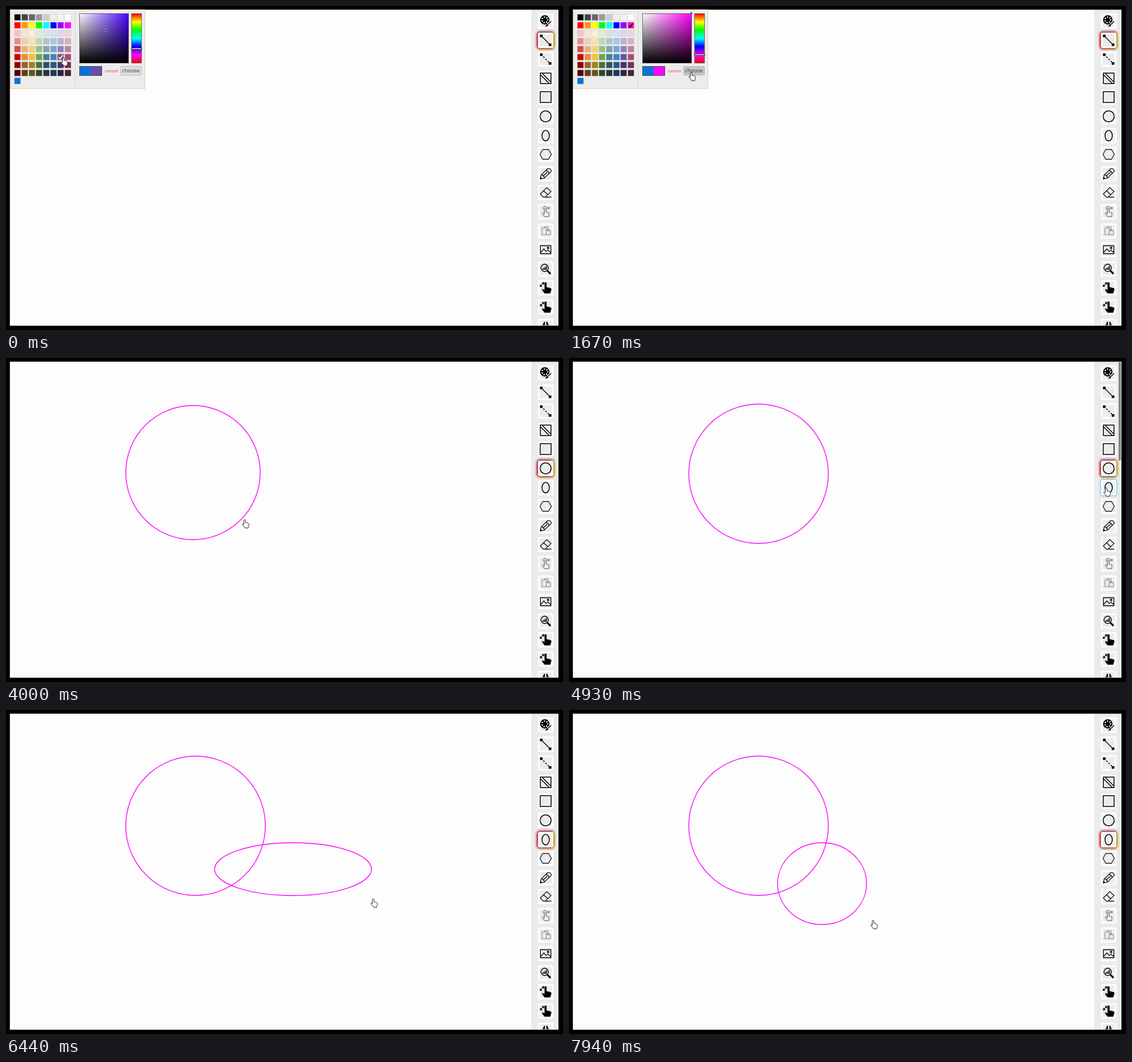
Write an HTML page that moves like this. It is 980 px wide and 571 px high and loops after 8 s.

```html
<!DOCTYPE html>
<html lang="en">
<head>
<meta charset="utf-8">
<title>Drawing board</title>
<style>
html, body { margin: 0; width: 100%; height: 100%; overflow: hidden; background: #000; }
#stage { position: absolute; left: 0; top: 0; width: 980px; height: 571px; overflow: hidden; background: #000; }
#bar { position: absolute; left: 924px; top: 6px; width: 48px; height: 557px; overflow: hidden; }
.tool { position: absolute; left: 12px; width: 27px; height: 27px; border-radius: 3px; background: #fdfdfd; }
.tool::before { content: ""; position: absolute; inset: 3px; background: #ebebeb; }
.tool svg { position: absolute; left: 0; top: 0; }
.tool.hover { box-shadow: 0 0 3px 1px #3fd0d4; }
.tool.on { box-shadow: -2px 0 4px #d0102c, 2px 0 4px #c9c000, 0 -2px 4px #7030a0, 0 2px 4px #a86420; }
#thumb { position: absolute; left: 43px; top: 1px; width: 4px; height: 174px; border-radius: 2px; background: #858585; }
.layer { position: absolute; left: 0; top: 0; }
text { font-family: "Open Sans", "Noto Sans", sans-serif; }
</style>
</head>
<body>
<div id="stage">
  <svg class="layer" width="980" height="571">
    <rect x="6.8" y="6.5" width="917.2" height="557" fill="#fdfdfd"/>
    <rect x="924" y="6.5" width="48" height="557" fill="#ebebeb"/>
  </svg>
  <div id="bar"><div id="thumb"></div></div>
  <svg class="layer" width="980" height="571">
    <defs>
      <linearGradient id="white"><stop offset="0" stop-color="#fff"/><stop offset="1" stop-color="#fff" stop-opacity="0"/></linearGradient>
      <linearGradient id="black" x2="0" y2="1"><stop offset="0" stop-opacity="0"/><stop offset="1"/></linearGradient>
      <linearGradient id="hues" x2="0" y2="1"></linearGradient>
    </defs>
    <g fill="none" stroke="#f0f" stroke-width="1.4">
      <circle id="circle"/>
      <ellipse id="ellipse"/>
    </g>
    <g id="panel">
      <rect x="7.5" y="6.5" width="237" height="139" fill="#ececec" stroke="#f0c8a6"/>
      <path d="M121.5 7V145" stroke="#d6d6d6"/>
      <g id="palette"></g>
      <g id="mark" fill="none">
        <rect x="-5.5" y="-5.5" width="11" height="11" stroke="#f5a623"/>
        <path id="tick" d="M-3.5 .5L-1.2 3.2L3.5-3.5" stroke-width="1.9"/>
      </g>
      <rect id="tone" x="129" y="13" width="87" height="88"/>
      <rect x="129" y="13" width="87" height="88" fill="url(#white)"/>
      <rect x="129.5" y="13.5" width="86" height="87" fill="url(#black)" stroke="#444" stroke-width=".8"/>
      <circle id="dot" r="2" stroke="#fff" stroke-width=".7"/>
      <rect x="221" y="13.5" width="17.3" height="87" fill="url(#hues)" stroke="#444" stroke-width=".8"/>
      <rect id="slider" x="220.5" width="18.5" height="2.4" fill="#fff" stroke="#000" stroke-width=".8"/>
      <rect x="129" y="106" width="20" height="17" fill="#0b72d6"/>
      <rect id="fresh" x="149" y="106" width="20" height="17"/>
      <rect x="129.5" y="106.5" width="39" height="16" fill="none" stroke="#444" stroke-width=".9"/>
      <text x="174" y="116.8" font-size="7.9" fill="#d93f3f">cancel</text>
      <rect id="button" x="201.5" y="106.5" width="37" height="15.5" rx="2" stroke="#bbb"/>
      <text x="219.7" y="116.8" font-size="9.4" fill="#333" text-anchor="middle">choose</text>
    </g>
    <path id="hand" fill="#fff" stroke="#111" stroke-width=".9" stroke-linejoin="round"
      d="M-1.5 8.5V1.2a1.4 1.4 0 0 1 2.8 0V5.2l1-.3q1.2 0 1.4 1l1-.2q1.1.1 1.3 1h.4q.9.2.9 1.3V10.5q0 1-1 3V14.6H.2V13.4L-3.6 9.2q-1-1.3.1-1.9q.9-.4 2 1.2z"/>
  </svg>
</div>
<script>
const LOOP = 8000;
const $ = id => document.getElementById(id);
const set = (el, attrs) => { for (const k in attrs) el.setAttribute(k, attrs[k]); };
const show = (el, on) => { el.style.display = on ? '' : 'none'; };

// toolbar
const solid = d => `<path fill="#000" stroke="none" d="${d}"/>`;
const bigHand = solid('M-2 10L-6 4.5Q-7 2.5-5.2 2.2L-2 4.2V-8Q-1.7-9.8 0-9.8T1.6-8V-1L4-.6Q7.2 0 9.3 1.1Q10.4 1.8 10 3.6L8 10z');
const ends = solid('M-10-10h4.6v4.6h-4.6zM5.4 5.4H10V10H5.4z');

const icons = [
  '<circle cx="-1.5" cy="-2" r="8.2" fill="#000" stroke="none"/>' +
    '<circle cx="-1.5" cy="-2" r="5" stroke="#ebebeb" stroke-width="2.7" stroke-linecap="round" stroke-dasharray="0 4.49"/>' +
    '<path d="M9.5.5L3 6.5" stroke="#ebebeb" stroke-width="4"/><path d="M9.5.5L4 6"/>' +
    solid('M4.4 6.4Q4 10-1.5 9.6Q1 8.6 1.4 6.6T4.4 6.4z'),
  '<path d="M-8-8L8 8"/>' + ends,
  '<path d="M-8-8L8 8" stroke-dasharray="3 2.4"/>' + ends,
  '<path d="M-9.3-9.3H9.3V9.3H-9.3zM-9.3-6.5L6.5 9.3M-6.5-9.3L9.3 6.5"/>',
  '<path d="M-9.6-9.6H9.6V9.6H-9.6z"/>',
  '<circle r="9.7"/>',
  '<ellipse rx="6.4" ry="9.2"/>',
  '<path d="M-10 0L-5-8.6H5L10 0L5 8.6H-5z" stroke-width="1.1"/>',
  '<path d="M-9.5 9.5L-7.8 2.2L2.8-8Q5.4-10.5 8.4-7.6T8.2-2.4L-2.2 7.8zM-7.8 2.2Q-3 1.8-2.2 7.8M.6-5.8Q5.2-4.8 5.8-.2M-5 4.8L3-2.8" stroke-width="1.2"/>' +
    solid('M-9.6 9.6L-8.8 6L-6.2 8.6z'),
  '<path d="M-9.4 2.8L2-8.4L9.4-1.4L-1 8.4H-4zM-3.7-2.8L3.8 4M-4 8.4H10" stroke-width="1.2"/>',
  '<path d="M-2 8.8L-5.6 3.6Q-6.3 1.8-4.4 2L-2.2 3.8V-5Q-1.8-6.2-.8-6.2T.6-5V.4Q3 0 3.2 1.2Q5.8.8 6 3L5.4 8.8zM-3.7-3.8A3.5 3.5 0 1 1 2-3.8M5.5-8.5V-4.5M3.5-6.5H7.5" stroke="#444" stroke-width=".9"/>',
  '<path d="M-6.5-5.5H1V6.5H-6.5zM1-.5H8.5V6.5H1M-2.5-5.5V-7.5H4V-.5M3-.5V-2.5H6V-.5" stroke="#777" stroke-width=".9"/>',
  '<path d="M-9.2-7H9.2V7H-9.2zM-9 5L-3.2-1.5L1 3.2L4 .6L9 5.2" stroke-width="1.3"/><circle cx="4.3" cy="-3.2" r="1.4"/>',
  '<circle cx="-1.8" cy="-2" r="6.4"/><path d="M3 3L8.6 8.6" stroke-width="3"/>' +
    '<path d="M-4.6 1.6V-1.4M-1.8 1.6V-3M1 1.6V-5.2" stroke-width="1.9"/>',
  bigHand + '<path d="M-9.5-2.5L-3.5-8.5M-9.7-5.5V-2.3H-6.5M-6.5-8.8H-3.2V-5.5" stroke-width="1.2"/>',
  bigHand + '<path d="M-10.3-1L-7.3-4M-10.3-4.3H-7V-1M-2.3-9L-5.2-6.1M-5.5-9.2V-5.8H-2.2" stroke-width="1.2"/>',
  '<path d="M-2-8V8H-9zM2-8V8H9z"/>'
];
const slotY = i => 26.4 + 33.6 * i;
const tools = icons.map((art, i) => {
  const el = document.createElement('div');
  el.style.top = slotY(i) - 19.5 + 'px';
  el.innerHTML = `<svg width="27" height="27" viewBox="-13.5 -13.5 27 27" fill="none" stroke="#000" stroke-width="1.5">${art}</svg>`;
  $('bar').insertBefore(el, $('thumb'));
  return el;
});

// palette: greys, pure hues, then tints and shades of a muted row
const muted = ['#c00', '#e69138', '#f1c232', '#6aa84f', '#45818e', '#3d85c6', '#674ea7', '#a64d79'];
const blend = (to, part) => muted.map(c => `color-mix(in srgb, ${to} ${part}%, ${c})`);
const palette = [
  ['#000', '#444', '#666', '#999', '#ccc', '#eee', '#f3f3f3', '#fff'],
  ['#f00', '#f90', '#ff0', '#0f0', '#0ff', '#00f', '#90f', '#f0f'],
  ...[77, 55, 29].map(part => blend('white', part)),
  muted,
  ...[33, 57].map(part => blend('black', part)),
  ['#0b72d6']
];
const cell = (row, col) => [20.3 + 12.65 * col, 20 + 14 * row];
$('palette').innerHTML = palette.map((line, row) => line.map((color, col) => {
  const [x, y] = cell(row, col);
  return `<rect x="${x - 5.5}" y="${y - 5.5}" width="11" height="11" stroke="#d0d0d0" stroke-width=".5" style="fill:${color}"/>`;
}).join('')).join('');
$('hues').innerHTML = Array.from({ length: 7 }, (_, i) =>
  `<stop offset="${i / 6}" stop-color="hsl(${i * 60},100%,50%)"/>`).join('');

// pointer route: time, x, y
const route = [
  [0, 101, 91], [500, 84, 50], [860, 107, 31], [1130, 109, 33], [1640, 215, 117], [1750, 217, 118],
  [2210, 886, 211], [2480, 939, 222], [2738, 937, 203], [2870, 938, 198],
  [3310, 250, 114], [3930, 408, 290], [3970, 420, 285], [4067, 417, 294],
  [4390, 842, 240], [4650, 945, 229], [5225, 945, 229],
  [5780, 367, 234], [6400, 643, 327], [6440, 646, 333], [7250, 320, 372], [7540, 285, 403],
  [7885, 523.5, 378], [7925, 535, 371]
];
function pointer(t) {
  const i = route.findIndex(key => key[0] > t);
  if (i < 0) return route[route.length - 1].slice(1);
  const [t0, x0, y0] = route[i - 1], [t1, x1, y1] = route[i];
  const k = (t - t0) / (t1 - t0);
  return [x0 + (x1 - x0) * k, y0 + (y1 - y0) * k];
}

// the picture advances in even beats, with one pause before the ellipse tool is picked
const PAUSE = 4928, RESUME = 5225;
function snap(time) {
  if (time >= RESUME) return RESUME + Math.floor((time - RESUME) / 135) * 135;
  return Math.min(Math.floor(time / 136.9) * 136.9, PAUSE);
}

// a dragged shape trails the pointer slightly
const LAG = 40;
function dragBox(t, from, release, [x0, y0]) {
  const [x1, y1] = pointer(Math.max(from, Math.min(t, release)) - LAG);
  return { cx: (x0 + x1) / 2, cy: (y0 + y1) / 2, rx: Math.abs(x1 - x0) / 2, ry: Math.abs(y1 - y0) / 2 };
}

function drawPanel(t) {
  show($('panel'), t < 1750);
  const pick = t < 860
    ? { row: 5, col: 6, hue: 257, sat: .53, val: .655, tick: '#fff' }
    : { row: 1, col: 7, hue: 300, sat: .99, val: 1, tick: '#000' };
  set($('mark'), { transform: `translate(${cell(pick.row, pick.col)})` });
  set($('tick'), { stroke: pick.tick });
  set($('tone'), { fill: `hsl(${pick.hue},100%,50%)` });
  set($('dot'), { cx: 129 + 87 * pick.sat, cy: 13 + 87 * (1 - pick.val) });
  set($('slider'), { y: 12 + 87 * pick.hue / 360 });
  set($('fresh'), { fill: palette[pick.row][pick.col] });
  set($('button'), { fill: t >= 1500 ? '#c4c4c4' : '#dedede' });
}

function drawShapes(t) {
  show($('circle'), t >= 3400);
  const { cx, cy, rx, ry } = dragBox(t, 3400, 4107, [250, 114]);
  set($('circle'), { cx, cy, r: Math.hypot(rx, ry) });
  show($('ellipse'), t >= 5900);
  set($('ellipse'), dragBox(t, 5900, LOOP, [367, 234]));
}

function drawTools(t, x, y) {
  const active = t < 2300 ? 1 : t < 2870 ? -1 : t < RESUME ? 5 : 6;
  const under = x > 936 && x < 963 ? Math.round((y - slotY(0)) / 33.6) : -1;
  tools.forEach((el, i) => {
    el.className = 'tool' + (i === active ? ' on' : i === under ? ' hover' : '');
  });
  show($('thumb'), (t >= 2300 && t < 3400) || (t >= 4500 && t < 5600));
}

function draw(time) {
  const t = snap(time);
  const [x, y] = pointer(t);
  drawPanel(t);
  drawShapes(t);
  drawTools(t, x, y);
  set($('hand'), { transform: `translate(${x} ${y})` });
}

const start = performance.now();
function tick() {
  draw((performance.now() - start) % LOOP);
  requestAnimationFrame(tick);
}
tick();
</script>
</body>
</html>
```
